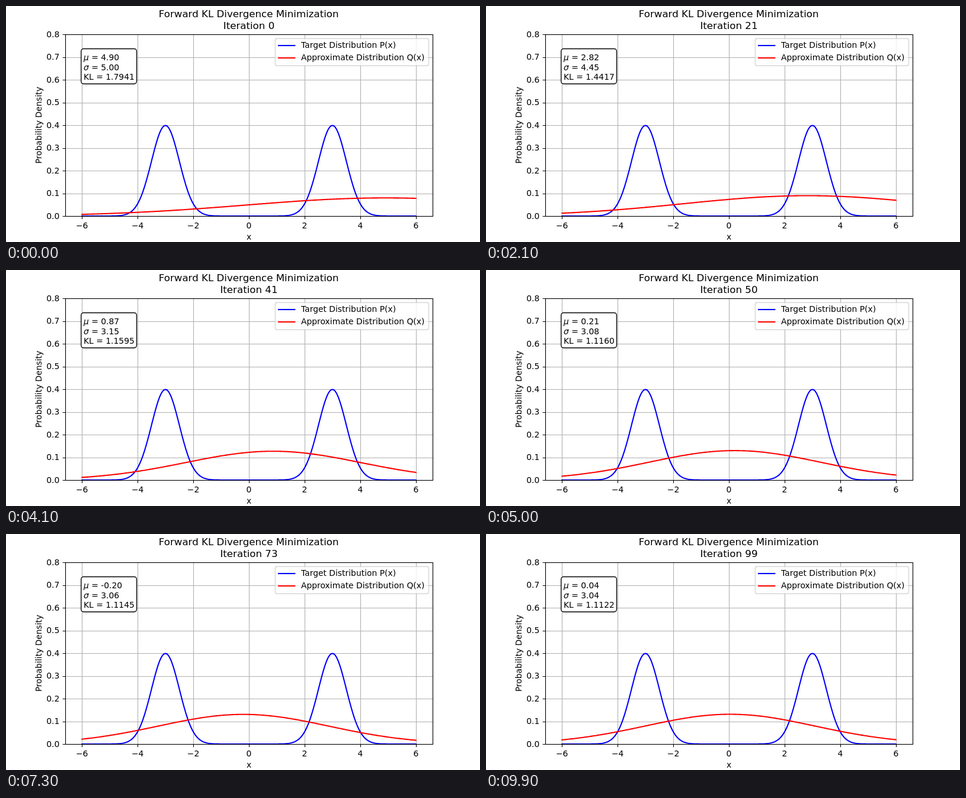
These frames come from a looping animation (800 px wide and 400 px high, 10000 ms). An HTML page:

```html
<!DOCTYPE html>
<html lang="en">
<head>
<meta charset="utf-8">
<title>Forward KL Divergence Minimization</title>
<style>
  html, body { margin: 0; width: 100%; height: 100%; overflow: hidden; background: #fff; }
  svg { display: block; width: 800px; height: 400px; }
  text { font: 13.889px "DejaVu Sans", sans-serif; fill: #000; }
  .title text { font-size: 16.667px; }
  .mid { text-anchor: middle; }
  .end { text-anchor: end; }
  .sym { font-style: italic; }
  .curve { fill: none; stroke-width: 2.083; stroke-linejoin: round; stroke-linecap: square; }
  .p { stroke: #00f; }
  .q { stroke: #f00; }
  .grid { stroke: #b0b0b0; stroke-width: 1.111; fill: none; }
  .axis { stroke: #000; stroke-width: 1.111; fill: none; }
</style>
</head>
<body>
<svg viewBox="0 0 800 400">
  <clipPath id="plot"><rect x="100" y="48" width="620" height="308"/></clipPath>
  <path id="grid" class="grid"/>
  <g clip-path="url(#plot)">
    <path id="p" class="curve p"/>
    <path id="q" class="curve q"/>
  </g>
  <path id="ticks" class="axis"/>
  <rect class="axis" x="100.5" y="48.5" width="620" height="308"/>
  <g id="labels"></g>
  <text class="mid" x="410" y="396">x</text>
  <text class="mid" transform="translate(59.5 202) rotate(-90)">Probability Density</text>

  <g class="title mid">
    <text x="409.7" y="19">Forward KL Divergence Minimization</text>
    <text id="iter" x="410" y="39"></text>
  </g>

  <rect x="126.8" y="72.5" width="93.7" height="59.5" rx="4.17" fill="#fff" stroke="#000" stroke-width="1.389"/>
  <text x="131" y="92"><tspan class="sym">μ</tspan> = <tspan id="mu"></tspan></text>
  <text x="131" y="109"><tspan class="sym">σ</tspan> = <tspan id="sigma"></tspan></text>
  <text x="131" y="125">KL = <tspan id="kl"></tspan></text>

  <rect x="454.4" y="55.2" width="259" height="46" rx="2.78" fill="#fff" stroke="#ccc" stroke-width="1.389" opacity=".8"/>
  <path class="curve p" d="M460 67H487.4"/>
  <path class="curve q" d="M460 88H487.4"/>
  <text x="498" y="71">Target Distribution P(x)</text>
  <text x="498" y="92">Approximate Distribution Q(x)</text>
</svg>
<script>
const $ = id => document.getElementById(id);
const STEPS = 100, STEP_MS = 100;
const px = x => 410 + x * 620 / 13.2;
const py = y => 356 - y * 385;
const snap = v => Math.floor(v + 0.5) + 0.5;
const normal = (x, m, s) => Math.exp(-((x - m) ** 2) / (2 * s * s)) / (s * Math.sqrt(2 * Math.PI));
const target = x => (normal(x, -3, 0.5) + normal(x, 3, 0.5)) / 2;

function curve(fn) {
  const pts = [];
  for (let i = 0; i <= 300; i++) {
    const x = -6 + i * 0.04;
    pts.push(px(x).toFixed(2) + ' ' + py(fn(x)).toFixed(2));
  }
  return 'M' + pts.join('L');
}

function drawAxes() {
  let grid = '', ticks = '', labels = '';
  for (let x = -6; x <= 6; x += 2) {
    const sx = snap(px(x));
    grid += `M${sx} 48V356`;
    ticks += `M${sx} 356V361.3`;
    labels += `<text class="mid" x="${px(x)}" y="377">${x < 0 ? '\u2212' : ''}${Math.abs(x)}</text>`;
  }
  for (let i = 0; i <= 8; i++) {
    const y = 356 - i * 38.5, sy = snap(y);
    grid += `M100 ${sy}H720`;
    ticks += `M95.6 ${sy}H100`;
    labels += `<text class="end" x="90.3" y="${Math.floor(y + 5.2)}">${(i / 10).toFixed(1)}</text>`;
  }
  $('grid').setAttribute('d', grid);
  $('ticks').setAttribute('d', ticks);
  $('labels').innerHTML = labels;
}

// Adam optimiser for a single parameter
function adam(rate) {
  let m = 0, v = 0, t = 0;
  return grad => {
    t++;
    m = 0.9 * m + 0.1 * grad;
    v = 0.999 * v + 0.001 * grad * grad;
    return -rate * (m / (1 - 0.9 ** t)) / (Math.sqrt(v / (1 - 0.999 ** t)) + 1e-8);
  };
}

function fit() {
  const moment = 9.25, gridScale = 0.9998;
  const stepMu = adam(0.1), stepLog = adam(0.1);
  const history = [];
  let mu = 5, logSigma = Math.log(5);
  for (let i = 0; i < STEPS; i++) {
    const sigma = Math.exp(logSigma), s2 = sigma * sigma;
    const spread = (moment + mu * mu) / s2;
    const kl = (logSigma - 0.5 + spread / 2) * gridScale;
    mu += stepMu(mu / s2);
    logSigma += stepLog(1 - spread);
    history.push({ mu, sigma, kl });
  }
  return history;
}

const history = fit();
const start = performance.now();
let shown = -1;

function show(i) {
  const { mu, sigma, kl } = history[i];
  $('iter').textContent = 'Iteration ' + i;
  $('mu').textContent = mu.toFixed(2);
  $('sigma').textContent = sigma.toFixed(2);
  $('kl').textContent = kl.toFixed(4);
  $('q').setAttribute('d', curve(x => normal(x, mu, sigma)));
  shown = i;
}

function tick() {
  const i = Math.floor((performance.now() - start) / STEP_MS) % STEPS;
  if (i !== shown) show(i);
  requestAnimationFrame(tick);
}

drawAxes();
$('p').setAttribute('d', curve(target));
show(0);
requestAnimationFrame(tick);
</script>
</body>
</html>
```
